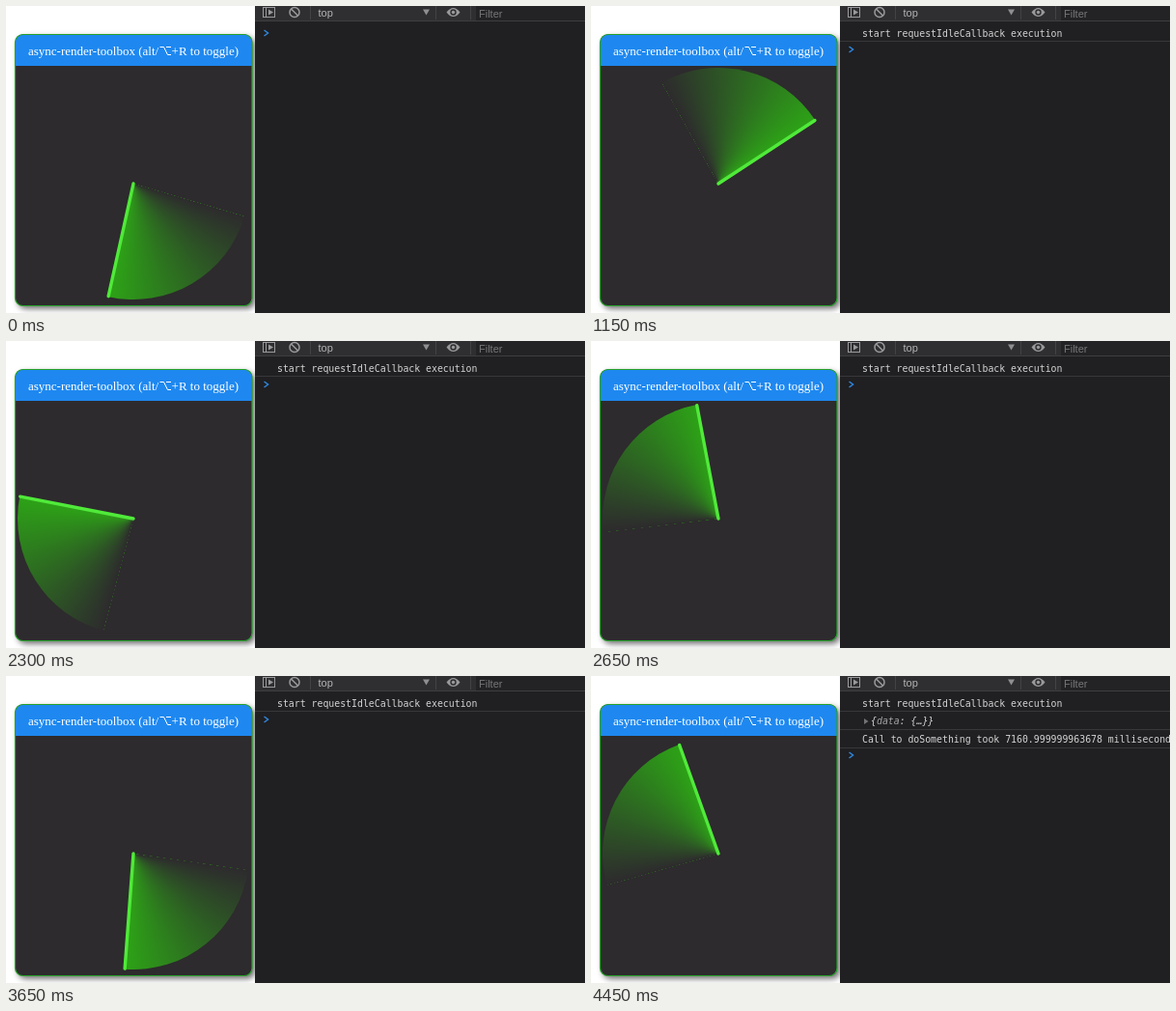
Recreate the animation shown at these times as an HTML page with a canvas. Size 600 by 318 pixels, loop 4500 ms.

```html
<!DOCTYPE html>
<html lang="en">
<head>
<meta charset="utf-8">
<title>Radar and console</title>
<style>
html, body { margin: 0; width: 100%; height: 100%; overflow: hidden; background: #fff; }
canvas { display: block; width: 600px; height: 318px; }
</style>
</head>
<body>
<canvas id="stage" width="600" height="318"></canvas>
<script>
const ctx = document.getElementById('stage').getContext('2d');
const LOOP = 4500, STEP = 50;
const START_LOG = 300, RESULT_LOG = 4150;
const SERIF = '13px "Liberation Serif", serif';
const SANS = '11px "Liberation Sans", sans-serif';
const MONO = '9.86px "DejaVu Sans Mono", monospace';
const rad = deg => deg * Math.PI / 180;

function rect(x, y, w, h, color) {
  ctx.fillStyle = color;
  ctx.fillRect(x, y, w, h);
}

function text(str, x, y, font, color, align = 'left') {
  ctx.font = font;
  ctx.fillStyle = color;
  ctx.textAlign = align;
  ctx.fillText(str, x, y);
}

function line(points, color, width) {
  ctx.beginPath();
  points.forEach(([x, y]) => ctx.lineTo(x, y));
  ctx.strokeStyle = color;
  ctx.lineWidth = width;
  ctx.stroke();
}

function shape(points, color) {
  ctx.beginPath();
  points.forEach(([x, y]) => ctx.lineTo(x, y));
  ctx.fillStyle = color;
  ctx.fill();
}

function circle(x, y, r) {
  ctx.beginPath();
  ctx.arc(x, y, r, 0, Math.PI * 2);
}

function drawPanel() {
  const outline = () => {
    ctx.beginPath();
    ctx.roundRect(9.5, 29.5, 245.5, 281, 8);
  };
  ctx.save();
  ctx.shadowColor = 'rgba(0,0,0,.6)';
  ctx.shadowBlur = 6;
  ctx.shadowOffsetX = 3;
  ctx.shadowOffsetY = 3;
  outline();
  ctx.fillStyle = '#2d2b2d';
  ctx.fill();
  ctx.restore();

  ctx.save();
  outline();
  ctx.clip();
  rect(9, 29, 247, 33, '#1e88f0');
  ctx.restore();
  outline();
  ctx.strokeStyle = '#27a32b';
  ctx.lineWidth = 1.2;
  ctx.stroke();

  text('async-render-toolbox (alt/', 23, 51, SERIF, '#fff');
  text('+R to toggle)', 241, 51, SERIF, '#fff', 'right');
  // Option key symbol
  line([[159.5, 42.5], [163.5, 42.5], [167.5, 50.5], [171, 50.5]], '#fff', 1);
  line([[166, 42.5], [171, 42.5]], '#fff', 1);
}

function drawRadar(deg) {
  const r = 120, span = rad(86), head = rad(deg % 360);
  ctx.save();
  ctx.translate(132, 184);
  ctx.rotate(head);

  const fade = ctx.createConicGradient(-span, 0, 0);
  const end = span / (Math.PI * 2);
  fade.addColorStop(0, 'rgba(45,166,22,0)');
  fade.addColorStop(end, 'rgba(45,166,22,.97)');
  ctx.beginPath();
  ctx.moveTo(0, 0);
  ctx.arc(0, 0, r, -span, 0);
  ctx.closePath();
  ctx.fillStyle = fade;
  ctx.fill();

  ctx.lineCap = 'round';
  line([[0, 0], [r - .5, 0]], '#50ea3a', 3.4);
  ctx.restore();
}

function drawToolbar() {
  const icon = '#9a9a9c';
  rect(258, 0, 342, 16, '#2f2e30');
  rect(258, 15, 342, 1, '#3e3d3f');
  rect(487, 0, 113, 15, '#232224');

  ctx.strokeStyle = icon;
  ctx.lineWidth = 1;
  ctx.strokeRect(266.5, 1.5, 12, 10);
  line([[269.5, 2], [269.5, 11]], icon, 1);
  shape([[272, 3.5], [277, 6.5], [272, 9.5]], icon);

  circle(299, 6.5, 5);
  ctx.lineWidth = 1.5;
  ctx.stroke();
  line([[295.5, 3], [302.5, 10]], icon, 1.5);

  [315, 445, 481].forEach(x => rect(x, 0, 1, 14, '#434244'));
  text('top', 323.5, 10.5, SANS, '#b4b4b5');
  shape([[432, 3.5], [439, 3.5], [435.5, 9.5]], '#8f8f91');

  ctx.beginPath();
  ctx.moveTo(456.5, 6.5);
  ctx.quadraticCurveTo(463.5, -2.5, 470.5, 6.5);
  ctx.quadraticCurveTo(463.5, 15.5, 456.5, 6.5);
  ctx.fillStyle = icon;
  ctx.fill();
  circle(463.5, 6.5, 3.2);
  ctx.fillStyle = '#2f2e30';
  ctx.fill();
  circle(463.5, 6.5, 1.7);
  ctx.fillStyle = icon;
  ctx.fill();

  text('Filter', 490, 11.5, SANS, '#77777a');
}

function drawConsole(t) {
  const ink = '#d4d4d5';
  const divider = y => rect(258, y, 342, 1, '#38373a');
  let prompt = 28;
  rect(258, 0, 342, 318, '#201f21');
  drawToolbar();

  if (t >= START_LOG) {
    text('start requestIdleCallback execution', 281, 32, MONO, ink);
    divider(36);
    prompt = 45;
  }
  if (t >= RESULT_LOG) {
    shape([[283, 44], [287.5, 47], [283, 50]], '#737375');
    const italic = 'italic ' + MONO;
    text('{', 290, 50, italic, ink);
    text('data', 296, 50, italic, '#a5a4a6');
    text(': {…}}', 319.7, 50, italic, ink);
    divider(55);
    text('Call to doSomething took 7160.999999963678 milliseconds', 281, 69, MONO, ink);
    divider(74);
    prompt = 82;
  }
  line([[267.5, prompt - 3], [271.5, prompt], [267.5, prompt + 3]], '#2f86dc', 1.5);
}

function draw(now) {
  const t = Math.floor(now % LOOP / STEP) * STEP;
  rect(0, 0, 600, 318, '#fff');
  drawPanel();
  drawRadar(102.5 + t * .195);
  drawConsole(t);
}

const began = performance.now();
function tick() {
  draw(performance.now() - began);
  requestAnimationFrame(tick);
}
tick();
</script>
</body>
</html>
```
